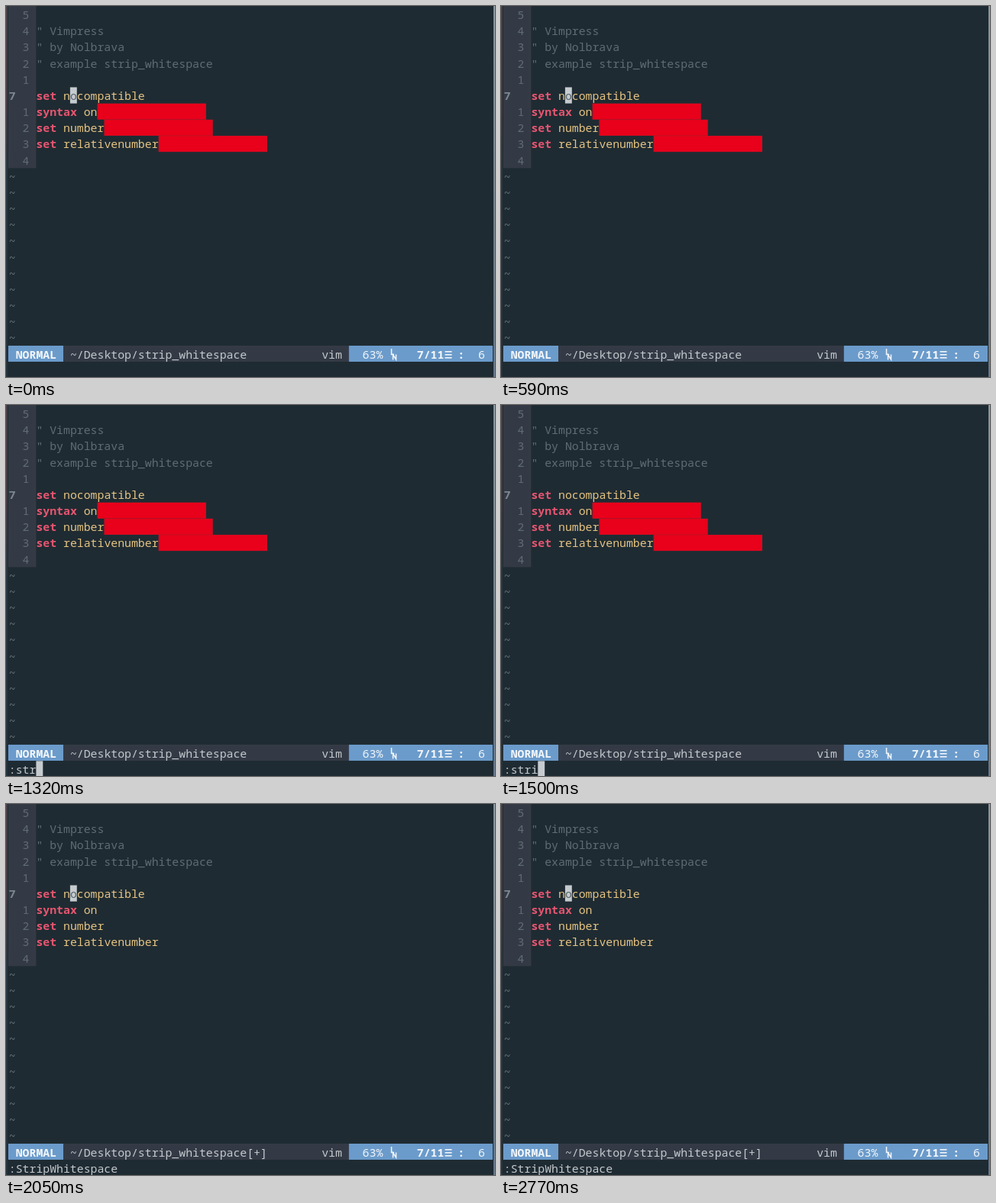
An HTML page with a canvas for the animation above (2810 ms loop, 640 px wide and 486 px high).

```html
<!DOCTYPE html>
<html lang="en">
<head>
<meta charset="utf-8">
<title>Strip trailing whitespace in Vim</title>
<style>
  html, body { margin: 0; width: 100%; height: 100%; overflow: hidden; background: #1f2b32; }
  canvas { display: block; }
</style>
</head>
<body>
<canvas id="stage" width="640" height="486"></canvas>
<script>
const ctx = document.getElementById("stage").getContext("2d");
const LOOP = 2810, CELL = 8.9, ROW = 21.17, STRIPPED_AT = 1960;
const FONT = '14.83px "Noto Sans Mono", "DejaVu Sans Mono", monospace';
const COLOR = {
  bg: "#1f2b32", panel: "#343a45", muted: "#5f6c75", plain: "#c3c9cd",
  keyword: "#e65570", value: "#e6c483", blue: "#6b9bcb", white: "#f2f6f9",
  cursor: "#c5cbcf", space: "#e9001b", spaceEdge: "#bd1426"
};

// Command line contents from each time on
const COMMANDS = [
  [0, ""], [900, ":"], [1000, ":s"], [1180, ":st"], [1280, ":str"],
  [1400, ":stri"], [1510, ":strip"], [1690, ":StripWhitespace"]
];
const COMMENTS = ["", "\" Vimpress", "\" by Nolbrava", "\" example strip_whitespace"];
const SETTINGS = [["set", "nocompatible"], ["syntax", "on"], ["set", "number"], ["set", "relativenumber"]];
const NUMBERS = [5, 4, 3, 2, 1, 7, 1, 2, 3, 4];

const colX = col => 3.8 + col * CELL;
const rowY = row => 0.6 + row * ROW;

function rect(x, y, w, h, color) {
  ctx.fillStyle = color;
  ctx.fillRect(x, y, w, h);
}

function text(str, col, row, color, bold) {
  ctx.font = (bold ? "bold " : "") + FONT;
  ctx.fillStyle = color;
  ctx.fillText(str, colX(col), rowY(row) + 16.4);
}

function cursor(col, row) {
  rect(colX(col), rowY(row), CELL, ROW, COLOR.cursor);
}

function edge(x, width, stops) {
  const fill = ctx.createLinearGradient(0, 0, 0, 486);
  stops.forEach(([at, color]) => fill.addColorStop(at, color));
  rect(x, 0, width, 486, fill);
}

function drawBuffer(stripped, editing) {
  rect(3, 0, colX(4) - 3, rowY(10), COLOR.panel);
  NUMBERS.forEach((n, row) => text(n, row === 5 ? 0 : 2, row, row === 5 ? "#7b8790" : COLOR.muted, row === 5));
  COMMENTS.forEach((line, row) => text(line, 4, row, COLOR.muted));

  SETTINGS.forEach(([keyword, value], i) => {
    const row = 5 + i, valueCol = 5 + keyword.length, end = valueCol + value.length;
    text(keyword, 4, row, COLOR.keyword, true);
    text(value, valueCol, row, COLOR.value);
    if (i && !stripped) {
      rect(colX(end), rowY(row), 16 * CELL, ROW, COLOR.spaceEdge);
      rect(colX(end) + 1, rowY(row) + 0.5, 16 * CELL - 2, ROW - 1, COLOR.space);
    }
  });
  if (!editing) {
    cursor(9, 5);
    text("o", 9, 5, "#56626b");
  }
  for (let row = 10; row < 21; row++) text("~", 0, row, "#66747d");
}

function drawStatus(stripped) {
  const y = rowY(21) - 0.2;
  rect(3, y, 634, 21, COLOR.panel);
  rect(3, y, colX(8) - 3, 21, COLOR.blue);
  rect(colX(50), y, 637 - colX(50), 21, COLOR.blue);
  text("NORMAL", 1, 21, COLOR.white, true);
  text("~/Desktop/strip_whitespace" + (stripped ? "[+]" : ""), 9, 21, COLOR.plain);
  text("vim", 46, 21, COLOR.plain);
  text("63%", 52, 21, COLOR.white);
  text("7/11", 60, 21, COLOR.white, true);
  text(":", 66, 21, COLOR.white, true);
  text("6", 69, 21, COLOR.white);

  // Line-number symbol and three-bar sign
  ctx.strokeStyle = COLOR.white;
  ctx.lineWidth = 1.5;
  ctx.stroke(new Path2D("M504.5 449v7.5h3.5M506.5 463.5v-6.5l4 6v-6.5"));
  for (let i = 0; i < 3; i++) rect(574.5, 452 + i * 4, 9, 1.6, COLOR.white);
}

function draw(time) {
  const stripped = time >= STRIPPED_AT;
  const command = COMMANDS.filter(([at]) => time >= at).pop()[1];
  const editing = command !== "" && !stripped;

  rect(0, 0, 640, 486, COLOR.bg);
  edge(0, 2, [[0, "#4a4144"], [0.25, "#463c40"], [0.45, "#293742"], [1, "#25333d"]]);
  edge(638, 2, [[0, "#8c989f"], [0.6, "#74828c"], [1, "#66788a"]]);
  drawBuffer(stripped, editing);
  drawStatus(stripped);
  text(command, 0, 22, COLOR.plain);
  if (editing) cursor(command.length, 22);
}

function tick() {
  draw(performance.now() % LOOP);
  requestAnimationFrame(tick);
}
tick();
</script>
</body>
</html>
```
